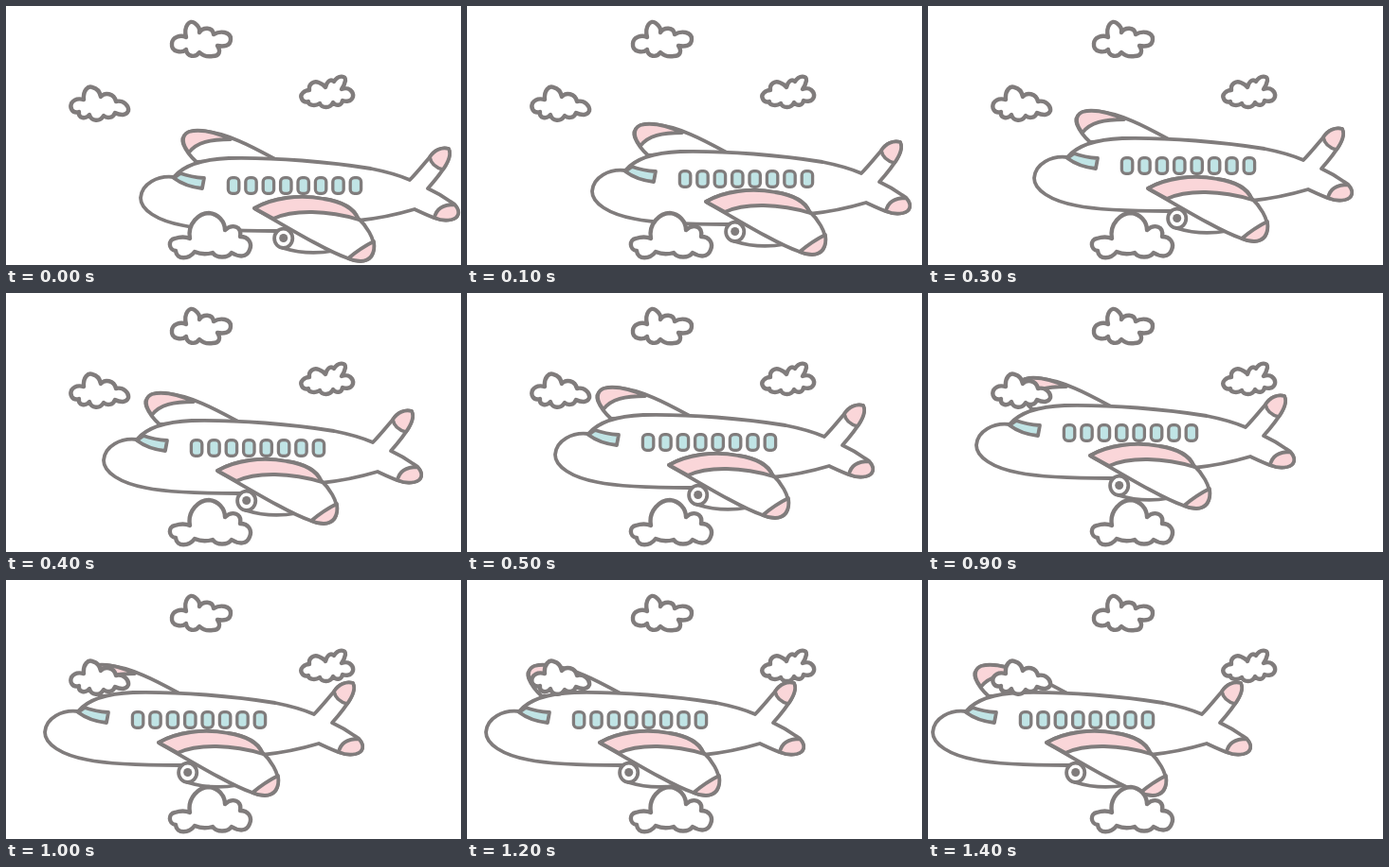
An HTML page that plays this animation: 480 by 274 pixels, repeating every 1.5 s.

```html
<!DOCTYPE html>
<html lang="en">
<head>
<meta charset="utf-8">
<title>Plane among clouds</title>
<style>
  html, body { margin: 0; width: 100%; height: 100%; overflow: hidden; background: #fff; }
  svg { display: block; width: 100%; height: 100%; }
  .ink { fill: #fff; stroke: #807c7c; stroke-width: 3.8; stroke-linejoin: round; stroke-linecap: round; }
  .pink { fill: #fad6d9; }
  .blue { fill: #c0e4e5; }
  #windows { stroke-width: 3.3; }
  #clouds { stroke-width: 4.4; }
</style>
</head>
<body>
<svg viewBox="0 0 480 274" class="ink">
  <g id="plane">
    <!-- far wing -->
    <path d="M284 162C260 149 235 135 207 132C191 130 184 138 187 146Q191 156 201 165Z"/>
    <path class="pink" d="M193 155C186 147 184 137 193 133C206 130 222 134 237 141C216 141 201 144 193 155Z"/>
    <!-- body and tail -->
    <path d="M177 181C188 168 208 162 235 161C284 160 342 165 385 172Q410 177 426 184C433 177 441 167 447 160C452 152 460 149 467 151C471 160 462 174 445 193Q458 199 469 207C478 212 480 222 472 225C461 230 446 222 431 215C411 221 390 225 371 227Q330 237 284 238C246 238 210 237 186 232C160 227 142 216 142 203C143 188 160 179 177 181Z"/>
    <path class="pink" d="M447 160C452 152 460 149 467 151C470 157 466 166 461 173Q449 170 447 160Z"/>
    <path class="pink" d="M452 224C454 214 462 210 473 210C480 217 478 224 470 226Q461 228 452 224Z"/>
    <path class="blue" d="M177 182L184 177Q195 181 209 182L207 193Q189 191 177 182Z"/>
    <g id="windows" class="blue"></g>
    <!-- engine -->
    <path d="M296 235L345 240V259Q318 264 292 256Z"/>
    <ellipse cx="292.7" cy="245.8" rx="9.6" ry="10.2"/>
    <circle cx="292.7" cy="245.5" r="4.5" fill="#807c7c" stroke="none"/>
    <!-- near wing -->
    <path d="M262 214C281 203 309 199 335 204C355 207 367 214 371 224C380 232 389 246 388 257C387 269 377 273 361 267C340 260 305 239 262 214Z"/>
    <path class="pink" d="M262 214C281 203 309 199 335 204C355 207 367 214 372 226C340 216 303 215 282 225Z"/>
    <path class="pink" d="M361 267Q374 256 388 249C390 262 384 270 374 270Q367 270 361 267Z"/>
  </g>
  <g id="clouds">
    <path d="M190 33C187 21 194 14 199 18C203 21 205 24 204 28C208 22 218 22 219 30C226 26 237 27 237 35C237 43 229 43 223 42C227 48 225 53 218 53C212 54 207 52 204 49C200 55 191 54 190 46C186 50 174 49 175 40C175 33 184 30 190 33Z"/>
    <path d="M82 99C81 89 87 84 91 86C96 87 99 91 100 96C104 91 114 92 116 101C124 99 130 106 129 111C127 116 121 116 115 113C113 119 106 119 103 116C99 123 90 122 88 115C84 120 76 119 77 112C70 114 67 108 69 103C72 98 78 98 82 99Z"/>
    <path d="M320 89C319 82 325 79 330 81Q335 83 337 86C338 81 342 76 346 80C350 73 359 73 358 79Q357 84 354 88C362 85 367 91 366 96C364 102 358 101 355 100C354 106 348 106 345 102C342 109 333 108 331 103C325 107 318 104 319 101C313 103 309 96 313 92Q316 89 320 89Z"/>
    <path d="M194 246C191 230 204 219 214 219C224 220 231 228 231 237C239 230 249 233 247 244C256 244 260 251 257 258C254 266 246 266 238 261C234 267 222 267 218 261Q208 264 199 260C193 268 180 269 179 259C171 258 171 247 178 246Q187 243 194 246Z"/>
  </g>
</svg>
<script>
  const STEP = 100, STEPS = 15;
  // flight path: [step, dx, dy]
  const path = [[0, 0, 0], [3, -30, -21], [5, -49, -32], [6, -60, -38], [7, -71, -41], [8, -81, -42], [10, -101, -42], [12, -122, -42], [14, -137, -42]];
  const plane = document.getElementById('plane');

  document.getElementById('windows').innerHTML = Array.from({ length: 8 }, (_, i) =>
    `<rect x="${234.4 + i * 18.4}" y="181.6" width="11.4" height="16.8" rx="4.4"/>`).join('');

  function position(step) {
    const next = Math.max(1, path.findIndex(p => p[0] >= step));
    const a = path[next - 1], b = path[next];
    const k = (step - a[0]) / (b[0] - a[0]);
    return [1, 2].map(i => Math.round(a[i] + (b[i] - a[i]) * k));
  }

  const start = performance.now();
  function draw() {
    const step = Math.floor((performance.now() - start) / STEP) % STEPS;
    plane.setAttribute('transform', `translate(${position(step)})`);
    requestAnimationFrame(draw);
  }
  draw();
</script>
</body>
</html>
```
